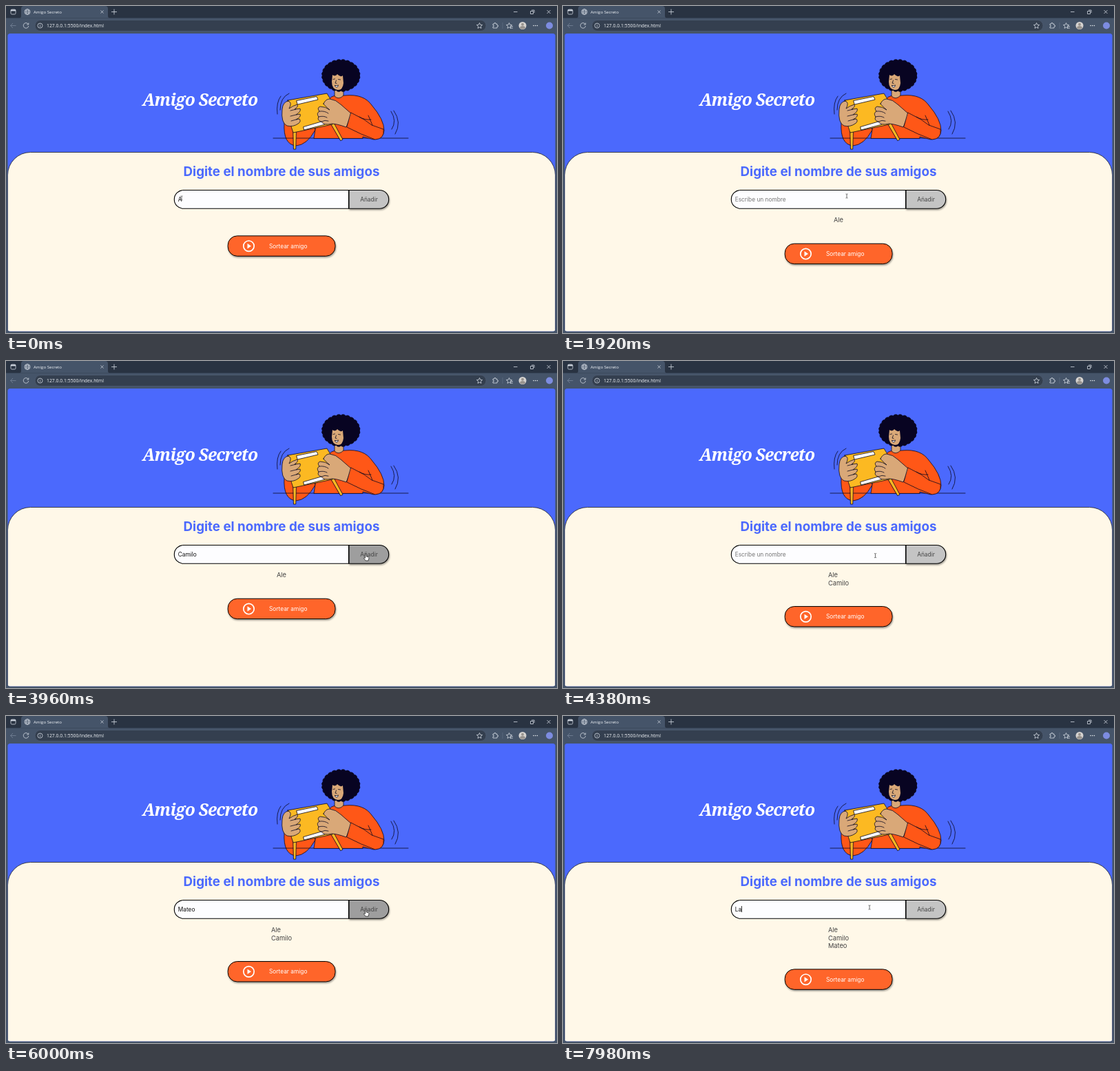
An HTML page that plays this animation: 800 px wide and 475 px high, repeating every 8000 ms.

```html
<!DOCTYPE html>
<html lang="es">
<head>
<meta charset="utf-8">
<title>Amigo Secreto</title>
<style>
html, body { margin: 0; width: 100%; height: 100%; overflow: hidden; background: #455469; }
svg { position: absolute; left: 0; top: 0; }
text, #list { font-family: Inter, sans-serif; }
.ui { font-family: "Open Sans", sans-serif; fill: #f1f4f8; }
.ico { fill: none; stroke: #d3dae3; stroke-width: .8; }
.ink { stroke: #0c0a20; stroke-width: .8; stroke-linejoin: round; stroke-linecap: round; }
.line { fill: none; }
.skin { fill: #d9a878; }
.top { fill: #ff5717; }
.drum { fill: #fcb922; }
.field { font-size: 8.33px; }
#list { position: absolute; left: 400px; top: 305.2px; transform: translateX(-50%);
  white-space: pre; font-size: 9.3px; line-height: 11.33px; color: #444; }
</style>
</head>
<body>
<svg width="800" height="475" viewBox="0 0 800 475">
  <defs>
    <filter id="shadow" x="-10%" y="-20%" width="120%" height="160%">
      <feDropShadow dx=".8" dy="1.7" stdDeviation="1.3" flood-opacity=".4"/>
    </filter>
    <clipPath id="page"><rect x="2.500" y="40" width="795" height="432.500" rx="3.500"/></clipPath>
  </defs>

  <!-- browser -->
  <rect width="800" height="475" fill="#455469"/>
  <rect width="800" height="17.500" fill="#293342"/>
  <path d="M19 17.500q3 0 3-3V4q0-4 4-4h118q4 0 4 4v10.500q0 3 3 3z" fill="#455469"/>
  <rect x="42" y="20.500" width="655" height="16" rx="8" fill="#343f4f" stroke="#56647a" stroke-width=".5"/>
  <text class="ui" x="40" y="11" font-size="6.100">Amigo Secreto</text>
  <text class="ui" x="59" y="31" font-size="6.850">127.0.0.1:5500/index.html</text>
  <g class="ico">
    <rect x="7" y="5" width="7" height="7" rx="1.500"/><path d="M7 6.300h7" stroke-width="2"/>
    <circle cx="31" cy="8.500" r="4"/><ellipse cx="31" cy="8.500" rx="1.800" ry="4"/><path d="M27 7.200h8M27 9.800h8"/>
    <path d="M137.500 6.500l4 4m0-4l-4 4M153 8.500h8m-4-4v8"/>
    <path d="M737 8.500h5.500M761.500 7.500h4v4h-4zM763 6h4v4M785.500 6l5 5m0-5l-5 5"/>
    <path d="M14.500 28.500h-8m3.500-3.500l-3.500 3.500 3.500 3.500" stroke="#77859a"/>
    <path d="M32 26a3.800 3.800 0 1 0 .8 3M32.800 24.500v2.500h-2.500"/>
    <circle cx="49.500" cy="28.500" r="3.500"/><path d="M49.500 28v2.300M49.500 26.300v.8"/>
    <path id="star" d="M687.500 24.500l1.200 2.700 2.900.3-2.200 2 .6 2.900-2.500-1.500-2.500 1.500.6-2.900-2.200-2 2.900-.3z"/>
    <path d="M707 26h2q-.3-1.700 1-1.700t1 1.700h2v2q1.700-.3 1.700 1t-1.700 1v2h-6v-2q1.500 0 1.500-1t-1.500-1z"/>
    <path d="M721 24v9" stroke="#66748a" stroke-width=".6"/>
    <use href="#star" x="43"/><path d="M732 29.500h4M732 32h4"/>
  </g>
  <circle cx="750" cy="28.500" r="5.500" fill="#d7d4d1"/>
  <circle cx="750" cy="26.700" r="2" fill="#98938e"/>
  <path d="M746 32q0-3 4-3t4 3q-4 3-8 0" fill="#98938e"/>
  <g fill="#e9edf2"><circle cx="766" cy="28.500" r=".8"/><circle cx="768.700" cy="28.500" r=".8"/><circle cx="771.400" cy="28.500" r=".8"/></g>
  <circle cx="789" cy="28.500" r="5" fill="#7d8ce0"/>

  <!-- page -->
  <g clip-path="url(#page)">
    <rect y="39" width="800" height="436" fill="#4b69fd"/>
    <path d="M2.500 480V245.500a33 33 0 0 1 33-33h729a33 33 0 0 1 33 33v234.500z" fill="#fff8e8" stroke="#222" stroke-width=".8"/>
  </g>
  <text x="198" y="145" style="font-family:'Noto Serif',serif" font-size="24.500" letter-spacing="-.85" font-weight="800" font-style="italic" fill="#fff">Amigo Secreto</text>

  <!-- woman with a drum-shaped box -->
  <g class="ink">
    <path class="top" d="M404 170Q402 201 421 203Q437 202 449 180L446 168z"/>
    <path class="line" d="M388 192h196"/>
    <path class="top" d="M447 192L452 160 467 137Q472 131 478 130H492C512 128 524 134 531 144Q549 165 549 181Q548 193 534 194L518 190 518 192z"/>
    <path class="skin" d="M477 117V131Q483 137 490 130V116z"/>
    <path id="hair" fill="#080422"/>
    <path d="M474 100Q478 103 481 99Q486 104 489 101L490 112Q489 122 482 122Q473 121 473 110z" class="skin" stroke="none"/>
    <path class="line" d="M475 106.500l2.500-.6M482.500 106.500l3 .5M479.500 108l-1.500 4 2 .4"/>
    <path d="M477.500 115.500q3 .8 5-.6-.4 3.400-2.800 3.200-1.600-.5-2.200-2.600" fill="#fff"/>
    <path class="drum" d="M417 180h4.500l-.7 28h-3zM470 168l4-2 15 28-3 1.500z"/>
    <path class="drum" d="M409 137L466 127Q480 145 474 172L417 184Q411 170 409 137z"/>
    <path d="M422 137.500L451 131.500 453 136 423.500 143zM432 175.500L461 167 463 172 433 180z" fill="#fff"/>
    <path class="skin" d="M410 138Q402 139 401 150Q399 170 408 174Q417 176 424 171Q429 168 426 164L421 165Q429 161 427 157L421 158Q429 153 427 149L419 150Q425 146 423 143Q416 145 411 149Q416 140 410 138z"/>
    <path class="line" d="M413 152l8-2M413 160l8-2M414 167l7-2"/>
    <path class="skin" d="M461 142Q464 135 470 135Q479 136 486 143L502 157 494 176Q480 171 473 171Q461 174 458 168Q451 166 454 161Q450 156 455 153Q451 148 456 146Q464 146 470 151Q463 145 461 142z"/>
    <path class="line" d="M455 153q8-1 13 3M454 161q7-2 12 1M458 168q5-3 10-1"/>
    <path class="top" d="M501 155L520 165 531 173 548 179Q550 193 536 194Q516 187 495 176z"/>
    <path class="line" d="M513 161q8 5 17 4M526 159l6 14"/>
    <path class="line" d="M394 157q-2-17 5-26M398 151q0-18 13-24M559 153q9 14 1 26M563 152q12 17 2 34"/>
  </g>

  <text x="400" y="247.200" text-anchor="middle" font-size="18.750" font-weight="700" fill="#4b69fd">Digite el nombre de sus amigos</text>

  <!-- form -->
  <g stroke="#000" stroke-width="1.100">
    <path id="add" d="M498 267.500h44.300a13.400 13.400 0 0 1 0 26.800h-44.300z" filter="url(#shadow)"/>
    <path d="M497.500 267.500H257.700a13.400 13.400 0 0 0 0 26.800h239.800z" fill="#fdfdff"/>
  </g>
  <text class="field" x="527" y="284" text-anchor="middle" fill="#444">Añadir</text>
  <text class="field" id="entry" x="249.700" y="283.500"></text>
  <path id="caret" d="M0 276v9" stroke="#111" stroke-width=".9"/>

  <g id="draw">
    <rect x="322.200" y="333.900" width="155.800" height="29.400" rx="13.500" fill="#ff652b" stroke="#000" filter="url(#shadow)"/>
    <circle cx="352.500" cy="348.700" r="7.700" fill="none" stroke="#fff" stroke-width="1.700"/>
    <path d="M350.500 345v7.400l5.500-3.700z" fill="#fff"/>
    <text class="field" x="409.700" y="351.700" text-anchor="middle" fill="#fff">Sortear amigo</text>
  </g>
</svg>
<div id="list"></div>
<svg width="800" height="475" viewBox="0 0 800 475">
  <path id="beam" d="M-1.500-3h1l.5.500.5-.5h1M0-2.500v5M-1.500 3h1l.5-.5.5.5h1" fill="none" stroke="#444" stroke-width=".8"/>
  <path id="hand" d="M-1.500-4q1-1.200 1.700 0v3l3 .8q1 .5.700 2l-.8 3.200h-4l-2.700-3.500q-.3-1.500 2.100-.2z" fill="#fff" stroke="#111" stroke-width=".7"/>
</svg>
<script>
const $ = id => document.getElementById(id);
const LOOP = 8000, BLINK = 530, ROW = 11.33;

// name, time of each keystroke, time the entry is added, time the field gets focus
const words = [
  { name: 'Ale', keys: [-600, 180, 240], add: 1110, focus: -900 },
  { name: 'Camilo', keys: [2340, 2460, 2580, 2700, 2880, 3060], add: 4050, focus: 1980 },
  { name: 'Mateo', keys: [4800, 4920, 5040, 5160, 5340], add: 6180, focus: 4680 },
  { name: 'La', keys: [7740, 7900], add: 9000, focus: 7260 }
];

// pointer: time, x, y
const path = [
  [0, 255, 279], [840, 255, 279], [1110, 519, 293], [1260, 519, 293],
  [1860, 412, 276], [3360, 412, 276], [3840, 523, 285], [4140, 523, 285],
  [4640, 376, 280], [5520, 376, 280], [6000, 523, 286], [6240, 523, 286],
  [6660, 445, 278], [LOOP, 445, 278]
];

function pointer(t) {
  const i = path.findIndex(p => p[0] > t), [t0, x0, y0] = path[i - 1], [t1, x1, y1] = path[i];
  const u = (t - t0) / (t1 - t0), e = u * u * (3 - 2 * u);
  return [x0 + (x1 - x0) * e, y0 + (y1 - y0) * e];
}

function curls() {
  const n = 24, at = i => {
    const a = i / n * Math.PI * 2;
    return `${486.3 + 27 * Math.cos(a)} ${101 + 22 * Math.sin(a)}`;
  };
  let d = 'M' + at(0);
  for (let i = 1; i <= n; i++) d += `A4.5 4.5 0 0 1 ${at(i)}`;
  return d + 'z';
}

function render(t) {
  const added = words.filter(w => t >= w.add).map(w => w.name);
  const word = words[added.length];
  const typed = word.keys.filter(k => t >= k);
  const text = word.name.slice(0, typed.length);
  const entry = $('entry');
  entry.textContent = text || 'Escribe un nombre';
  entry.setAttribute('fill', text ? '#111' : '#757575');

  const since = t - (typed.at(-1) ?? word.focus);
  const lit = since >= 0 && since % (2 * BLINK) < BLINK;
  const x = 250 + (text ? entry.getComputedTextLength() : 0);
  $('caret').setAttribute('transform', `translate(${x} 0)`);
  $('caret').style.display = lit ? '' : 'none';

  $('list').textContent = added.join('\n');
  $('draw').setAttribute('transform', `translate(0 ${added.length * ROW})`);

  const [px, py] = pointer(t), over = px > 498;
  $('add').setAttribute('fill', over ? '#9e9e9e' : '#c4c4c4');
  for (const id of ['beam', 'hand']) {
    $(id).setAttribute('transform', `translate(${px} ${py})`);
    $(id).style.display = (id === 'hand') === over ? '' : 'none';
  }
}

$('hair').setAttribute('d', curls());
const start = performance.now();
function tick() {
  render((performance.now() - start) % LOOP);
  requestAnimationFrame(tick);
}
tick();
</script>
</body>
</html>
```
